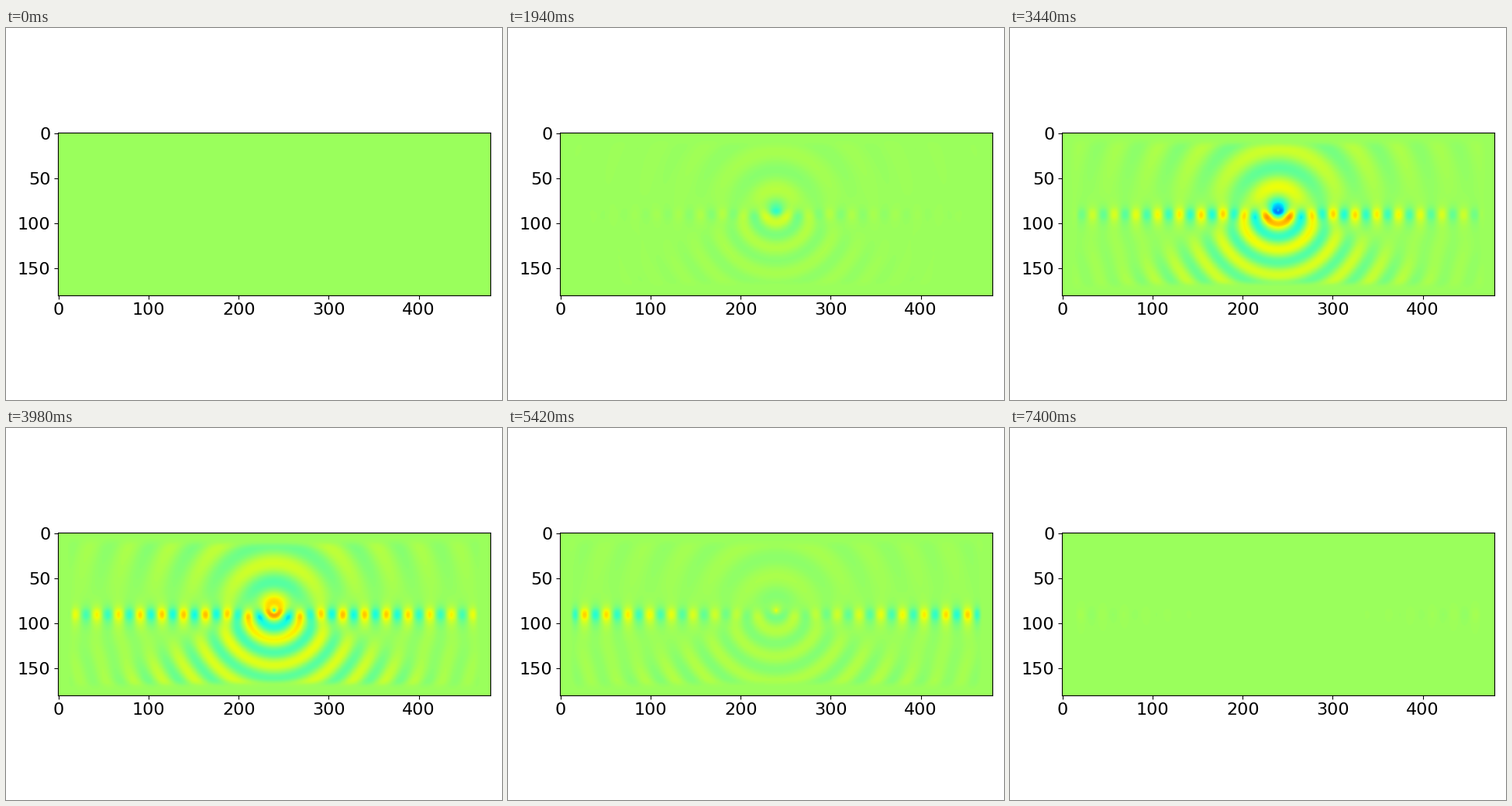
A matplotlib script for the animation above (8 s loop, 640 by 480 pixels).

```python
import numpy as np
import matplotlib.pyplot as plt
from matplotlib.animation import FuncAnimation

# Line source on a thin slab waveguide over a glass substrate,
# solved with a 2D FDTD scheme (Ez, Hx, Hy) and split-field PML.
# Lengths are in cells, times in output steps.
NX, NY, PML = 480, 180, 20
HALF = NX // 2            # mirror symmetry about the vertical centre line
STEPS, SUB = 116, 24
FREQ, WAVELENGTH = 0.402, 41.0
PEAK, WIDTH = 49.9, 17.5
N_CORE, N_SUB = 1.995, 1.45
ZERO_LEVEL = 0.538        # place of zero field on the colour scale

TICK, START, HOLD = 20, 500, 60
LOOP = 8000

dt = FREQ * WAVELENGTH / SUB


def pml_coefs(pos, size, both):
    """Decay and drive factors of the absorbing layer at the given positions."""
    depth = PML - pos
    if both:
        depth = np.maximum(depth, pos - (size - PML))
    loss = 2.59 * (np.clip(depth, 0, None) / PML) ** 2 * dt + 1e-9
    return np.exp(-loss), dt * -np.expm1(-loss) / loss


def current(t):
    envelope = np.exp(-0.5 * ((t - PEAK) / WIDTH) ** 2)
    return envelope * np.cos(2 * np.pi * (FREQ * t - 0.05))


def simulate():
    eps = np.ones((NY, 1))
    eps[85:95] = N_CORE ** 2
    eps[95:] = N_SUB ** 2

    ax_e, bx_e = pml_coefs(np.arange(HALF) + 0.5, HALF, False)
    ax_h, bx_h = pml_coefs(np.arange(1.0, HALF), HALF, False)
    ay_e, by_e = (c[:, None] for c in pml_coefs(np.arange(NY) + 0.5, NY, True))
    ay_h, by_h = (c[:, None] for c in pml_coefs(np.arange(1.0, NY), NY, True))
    bx_e = bx_e / eps
    by_e = by_e / eps

    ez = np.zeros((NY, HALF))
    ezx, ezy = np.zeros_like(ez), np.zeros_like(ez)
    hx, hy = np.zeros((NY + 1, HALF)), np.zeros((NY, HALF + 1))
    hx_in, hy_in = hx[1:-1], hy[:, 1:-1]
    drive = dt / eps[85:87, 0]

    fields = np.zeros((STEPS + 1, NY, HALF), dtype=np.float32)
    for n in range(1, STEPS + 1):
        for s in range(SUB):
            hy_in *= ax_h
            hy_in += bx_h * (ez[:, 1:] - ez[:, :-1])
            hx_in *= ay_h
            hx_in -= by_h * (ez[1:] - ez[:-1])
            ezx *= ax_e
            ezx += bx_e * (hy[:, 1:] - hy[:, :-1])
            ezy *= ay_e
            ezy -= by_e * (hx[1:] - hx[:-1])
            ezx[85:87, -1] -= drive * current(n - 1 + (s + 0.5) / SUB)
            np.add(ezx, ezy, out=ez)
        fields[n] = ez
    return fields


fields = simulate()
low = float(fields.min())
high = -low * (1 - ZERO_LEVEL) / ZERO_LEVEL


def full(n):
    return np.hstack([fields[n], fields[n][:, ::-1]])


fig = plt.figure(figsize=(6.4, 4.8), dpi=100)
w, h = 557.6, 209.1
ax = fig.add_axes([67.4 / 640, (240 - h / 2) / 480, w / 640, h / 480])
image = ax.imshow(full(0), cmap="jet", vmin=low, vmax=high, aspect="auto")
ax.set_xticks(range(0, 401, 100))
ax.set_yticks(range(0, 151, 50))
ax.tick_params(labelsize=16)


def update(i):
    ms = i * TICK
    n = 0 if ms < START else min(STEPS, (ms - START) // HOLD + 1)
    image.set_data(full(n))
    return (image,)


anim = FuncAnimation(fig, update, frames=LOOP // TICK, interval=TICK,
                     repeat=True, repeat_delay=0, blit=False)
plt.show()
```
